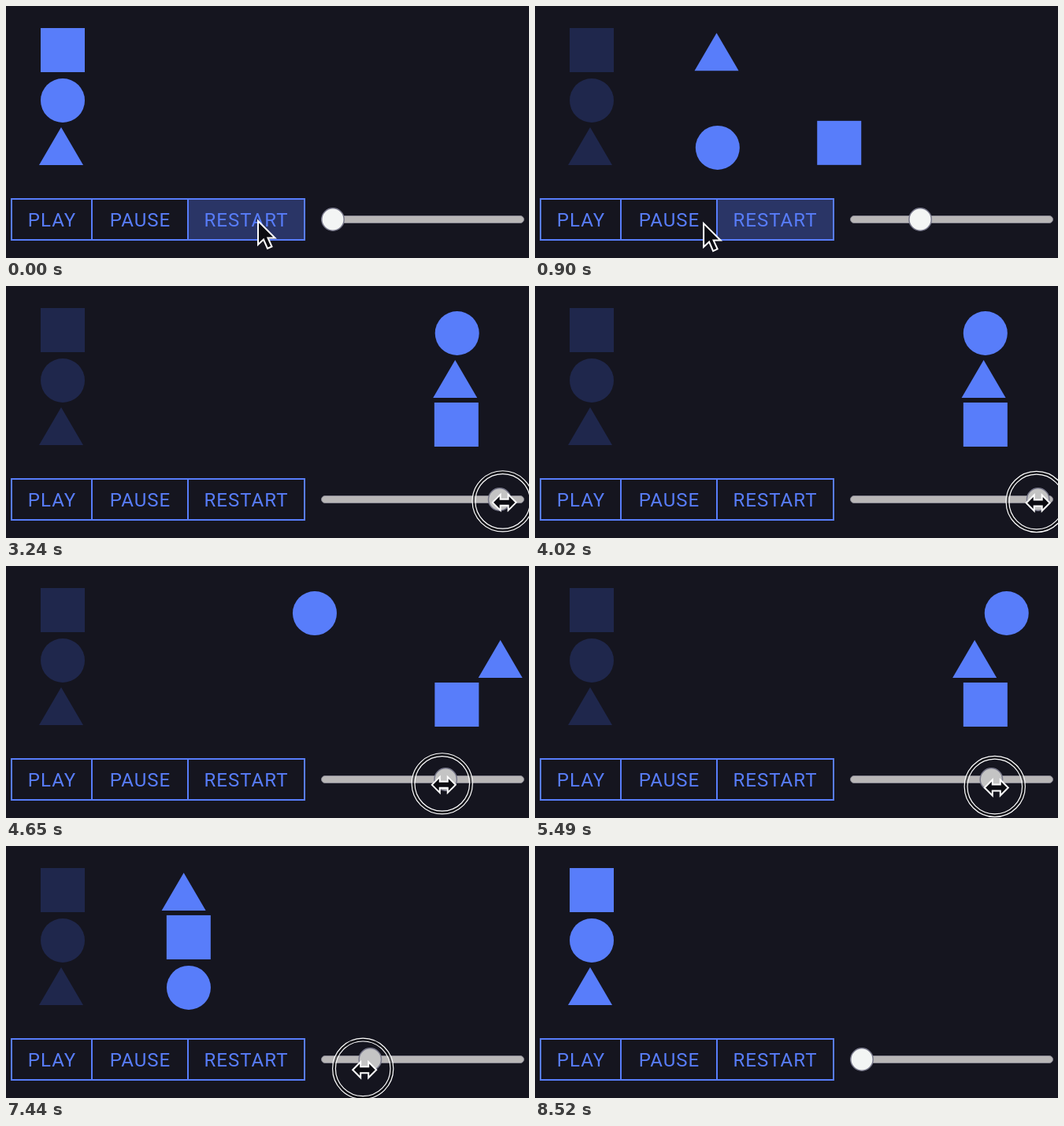
An HTML page for the animation above (8550 ms loop, 664 px wide and 320 px high).

```html
<!DOCTYPE html>
<html lang="en">
<head>
<meta charset="utf-8">
<title>Timeline controls</title>
<style>
html, body { margin: 0; width: 100%; height: 100%; overflow: hidden; background: #15151f; }
svg { display: block; width: 664px; height: 320px; }
text { font: 24px Roboto, "Liberation Sans", sans-serif; letter-spacing: 1px; text-anchor: middle; fill: #587dfa; }
.blue { fill: #587dfa; }
.ghost { fill: #1f274c; }
.frame { fill: none; stroke: #587dfa; stroke-width: 2; }
.cursor { fill: #0c0c12; stroke: #fff; stroke-width: 2; }
#ring { fill: none; stroke: #fff; stroke-width: 1.2; }
</style>
</head>
<body>
<svg viewBox="0 0 664 320">
  <defs>
    <rect id="sq" x="44" y="28" width="56" height="56"/>
    <circle id="ci" cx="72" cy="120" r="28"/>
    <path id="tr" d="M42 202L70 154L98 202Z"/>
  </defs>
  <g class="ghost"><use href="#sq"/><use href="#ci"/><use href="#tr"/></g>
  <g class="blue">
    <use id="square" href="#sq"/><use id="circle" href="#ci"/><use id="triangle" href="#tr"/>
  </g>
  <rect id="focus" x="231" y="245" width="148" height="52" fill="#2a3566"/>
  <path class="frame" d="M7 245H379V297H7ZM109 245V297M231 245V297"/>
  <text x="58.5" y="280">PLAY</text>
  <text x="170.5" y="280">PAUSE</text>
  <text x="305" y="280">RESTART</text>
  <rect x="400.5" y="266.5" width="257" height="9" rx="4.5" fill="#b9b7b7" stroke="#85848f"/>
  <circle id="thumb" cy="271" r="14.2" stroke="#77778a" stroke-width="1.5"/>
  <g id="ring">
    <circle r="37" stroke="#0c0c12" stroke-opacity=".6" stroke-width="3"/>
    <circle r="38.6"/><circle r="34.8"/>
  </g>
  <path id="arrow" class="cursor" d="M0 1V31L7 24.500L12 36L17.500 33.500L12.500 22.500H21.500Z"/>
  <path id="resize" class="cursor" d="M-15 0L-5 -10V-4H5V-10L15 0L5 10V4H-5V10Z"/>
</svg>
<script>
const LOOP = 8550, PAUSED = 1705, GRAB = 2700, RELEASE = 7850;
const $ = id => document.getElementById(id);
const smooth = u => u * u * (3 - 2 * u);
const elastic = u => 1 - 2 ** (-10 * u) * Math.cos(4 * Math.PI * u);
const show = (id, on) => $(id).style.display = on ? '' : 'none';
const move = (id, x, y) => $(id).setAttribute('transform', `translate(${x} ${y})`);

// Smooth path through [time, value] points.
function path(t, keys) {
  if (t <= keys[0][0]) return keys[0][1];
  for (let i = 1; i < keys.length; i++) {
    const [t0, a] = keys[i - 1], [t1, b] = keys[i];
    if (t < t1) return a + (b - a) * smooth((t - t0) / (t1 - t0));
  }
  return keys[keys.length - 1][1];
}

// Equal elastic steps to each value in turn.
function steps(time, duration, values) {
  const d = duration / values.length;
  const i = Math.min(Math.floor(time / d), values.length - 1);
  const from = i ? values[i - 1] : 0;
  return from + (values[i] - from) * elastic(Math.min(time / d - i, 1));
}

const drag = t => path(t, [
  [GRAB, 557], [3450, 643], [3880, 643], [5180, 510], [5560, 586],
  [6250, 511], [6900, 607], [7700, 415]
]);
const dragY = t => path(t, [[2520, 270], [2700, 273], [4020, 274], [5490, 280], [6630, 282], [7800, 283]]);

function pointer(t) {
  if (t < 1720) return [
    path(t, [[300, 320], [1050, 202], [1500, 200]]),
    path(t, [[300, 272], [1050, 275.4], [1500, 279]])
  ];
  if (t < 2520) {
    const s = smooth((t - 1720) / 800);
    return [200 + 357 * s, 279 - 9 * s - 39.5 * Math.sin(Math.PI * s)];
  }
  // The thumb trails slightly behind the pointer.
  return [drag(t + 30), dragY(t) + path(t, [[7900, 0], [8250, 70]])];
}

function draw(t) {
  const thumb = t < GRAB
    ? 415 + Math.min(Math.max(t / 0.9 - 26, 0), 1868) * 228 / 3000
    : drag(t);
  const time = (thumb - 415) / 228 * 3000;
  move('square', steps(time, 2000, [160, 320, 500]), steps(time, 2000, [60, 120, 120]));
  move('circle', steps(time, 3000, [160, 320, 500]), steps(time, 3000, [60, -60, -60]));
  move('triangle', steps(time, 3000, [160, 500]), steps(time, 3000, [-120, -60, -60]));

  const held = t >= GRAB && t < RELEASE;
  $('thumb').setAttribute('cx', thumb);
  $('thumb').setAttribute('fill', held ? '#c4c4c4' : '#f3f5f4');
  show('focus', t < GRAB);

  const [x, y] = pointer(t), sizing = t >= 2500 && t < RELEASE;
  move('ring', x, y);
  move('arrow', x, y);
  move('resize', x + 2, y + 1.5);
  show('ring', held || t > PAUSED - 100 && t < PAUSED);
  show('arrow', !sizing && t < 8300);
  show('resize', sizing);
}

const start = performance.now();
function tick() {
  draw((performance.now() - start) % LOOP);
  requestAnimationFrame(tick);
}
tick();
</script>
</body>
</html>
```
